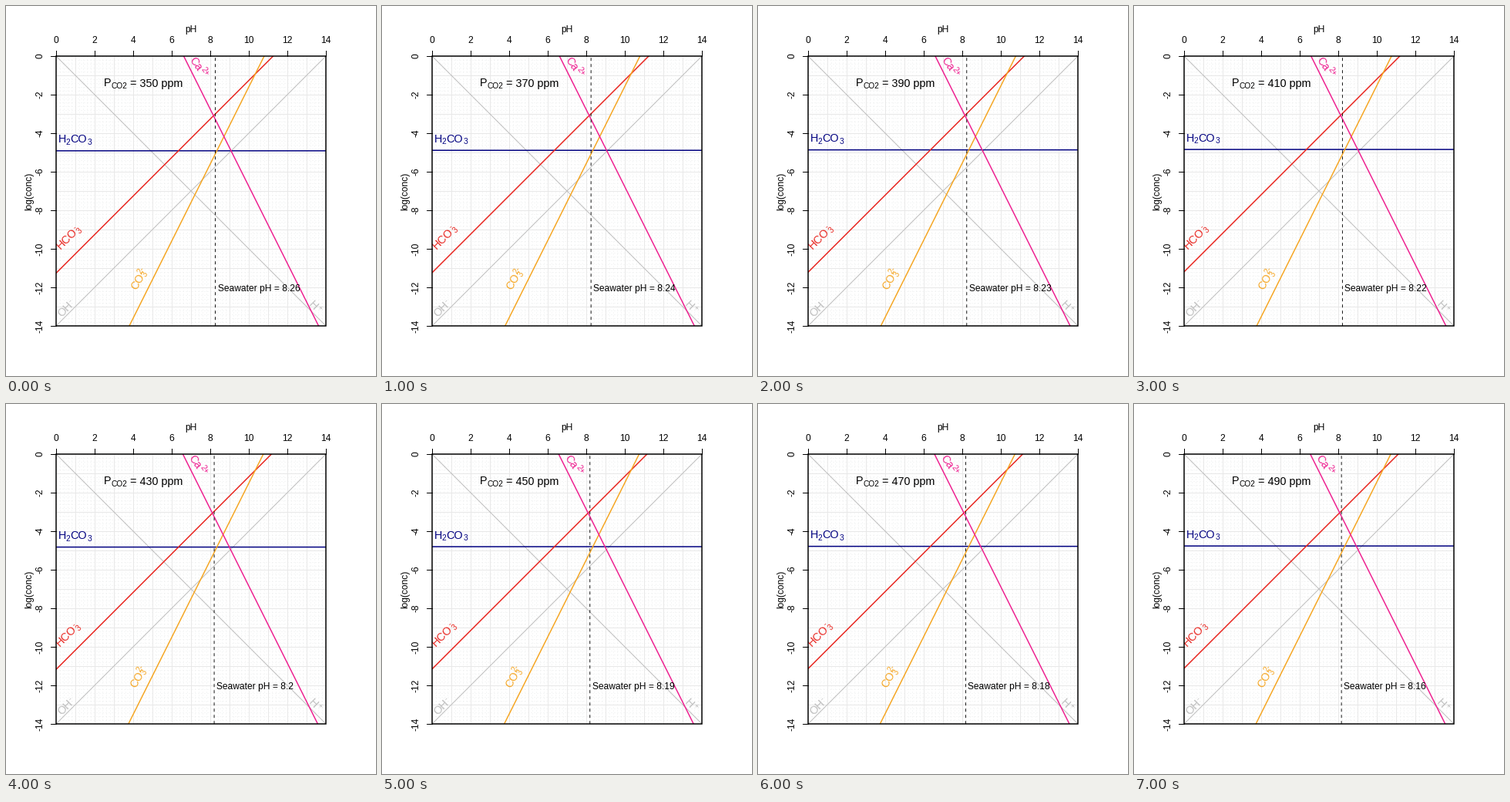
A matplotlib script that plays this animation: 480 by 480 pixels, repeating every 8 s.

```python
import numpy as np
import matplotlib.pyplot as plt
from matplotlib.animation import FuncAnimation
from matplotlib.patches import Rectangle

SIZE = 480
LO, HI = 64.8, 415.2          # plot box in pixels
UNIT = (HI - LO) / 14

NAVY, RED, ORANGE, PINK = "#000080", "#e8251f", "#f5a623", "#ee2090"
GRAY = "#bebebe"
BIG = 14.4                    # label size
SMALL = BIG * 0.7             # sub- and superscript size
SUB, SUP = -2.6, 5.2          # baseline shifts of the scripts

plt.rcParams["font.family"] = "Liberation Sans"
plt.rcParams["lines.scale_dashes"] = False

# 72 dpi makes one point equal to one pixel
fig = plt.figure(figsize=(SIZE / 72, SIZE / 72), dpi=72, facecolor="white")
ax = fig.add_axes([0, 0, 1, 1])
ax.set_xlim(0, SIZE)
ax.set_ylim(SIZE, 0)
ax.axis("off")

box = Rectangle((LO, LO), HI - LO, HI - LO, fill=False, ec="black", lw=1.5, zorder=6)
ax.add_patch(box)


def px(ph):
    return LO + UNIT * ph


def py(conc):
    return LO - UNIT * conc


def line(color, lw=1.5, z=3, **kw):
    artist, = ax.plot([], [], color=color, lw=lw, zorder=z, snap=False,
                      solid_capstyle="butt", dash_capstyle="butt", **kw)
    artist.set_clip_path(box)
    return artist


def text(x, y, s, size=12, color="black", ha="left", rot=0):
    return ax.text(x, y, s, fontsize=size, color=color, ha=ha, va="baseline",
                   rotation=rot, rotation_mode="anchor", zorder=5)


class Label:
    """Chemical label built from (text, advance, shift) pieces along a slanted baseline."""

    def __init__(self, pieces, color, rot=0):
        a = np.radians(rot)
        self.parts = []
        for s, along, up in pieces:
            t = text(0, 0, s, SMALL if up else BIG, color, rot=rot)
            t.set_clip_path(box)
            t.set_clip_on(True)
            dx = along * np.cos(a) - up * np.sin(a)
            dy = -along * np.sin(a) - up * np.cos(a)
            self.parts.append((t, dx, dy))

    def move(self, x, y):
        for t, dx, dy in self.parts:
            t.set_position((x + dx, y + dy))


def draw_grid():
    fine = px(np.arange(0, 14.01, 0.2))
    whole = px(np.arange(1, 14))
    dots = dict(colors="#e6e9e9", lw=0.8, linestyles=[(0, (1, 3))], zorder=1)
    solid = dict(colors="#e8e8e8", lw=1, zorder=1.5)
    for pos, style in ((fine, dots), (whole, solid)):
        ax.hlines(pos, LO, HI, **style)
        ax.vlines(pos, LO, HI, **style)


def draw_axes():
    for v in range(0, 15, 2):
        p = px(v)
        ax.plot([p, p], [LO - 7.2, LO], color="black", lw=1, zorder=6)
        ax.plot([LO - 7.2, LO], [p, p], color="black", lw=1, zorder=6)
        text(p, 48, str(v), ha="center")
        text(47.5, p, str(-v), ha="center", rot=90)
    text(240, 34, "pH", ha="center")
    text(33, 240, "log(conc)", ha="center", rot=90)


draw_grid()
draw_axes()
for ends in ([LO, HI], [HI, LO]):
    line(GRAY, lw=1, z=2).set_data([LO, HI], ends)

Label([("OH", 0, 0), ("-", 21.6, SUP)], GRAY, 45).move(72, 404)
Label([("H", 0, 0), ("+", 10.4, SUP)], GRAY, -45).move(391.5, 388)

h2co3 = line(NAVY)
hco3 = line(RED)
co3 = line(ORANGE)
ca = line(PINK)
sea = line("black", lw=0.9, z=4, linestyle=(0, (4, 4)))

h2co3_label = Label([("H", 0, 0), ("2", 10.4, SUB), ("CO", 16, 0), ("3", 37.6, SUB)], NAVY)
hco3_label = Label([("HCO", 0, 0), ("3", 32, SUB), ("-", 32, SUP)], RED, 45)
co3_label = Label([("CO", 0, 0), ("3", 21.6, SUB), ("2-", 21.6, SUP)], ORANGE, 60)
ca_label = Label([("Ca", 0, 0), ("2+", 18.4, SUP)], PINK, -55)

text(126.6, 104.5, "P", BIG)
text(136.3, 107.1, "CO2", SMALL)
pressure = text(157, 104.5, "", BIG)
sea_text = text(0, 370, "")

PH = np.array([0.0, 14.0])


def update(i):
    ppm = 350 + 20 * i
    rise = np.log10(ppm / 350)
    acid = np.log10(ppm * 1e-6) - 1.46
    bicarb = acid - 6.35
    carb = bicarb - 10.33

    h2co3.set_data(px(PH), py(acid + 0 * PH))
    hco3.set_data(px(PH), py(bicarb + PH))
    co3.set_data(px(PH), py(carb + 2 * PH))
    ca.set_data(px(PH), py(-8.36 - carb - 2 * PH))

    ph = 8.2609 - rise * 2 / 3
    sea.set_data([px(ph)] * 2, [HI, LO])
    sea_text.set_text(f"Seawater pH = {round(ph, 2)}")
    sea_text.set_x(px(ph) + 3)
    pressure.set_text(f" = {ppm} ppm")

    shift = UNIT * rise / 2
    h2co3_label.move(67.5, py(acid) - 10.4)
    hco3_label.move(71.2 - shift, 316.5 - shift)
    co3_label.move(169 - shift, 369)
    ca_label.move(237.5 - shift, 70)


anim = FuncAnimation(fig, update, frames=8, interval=1000, init_func=lambda: None,
                     repeat=True, repeat_delay=0, blit=False)
plt.show()
```
